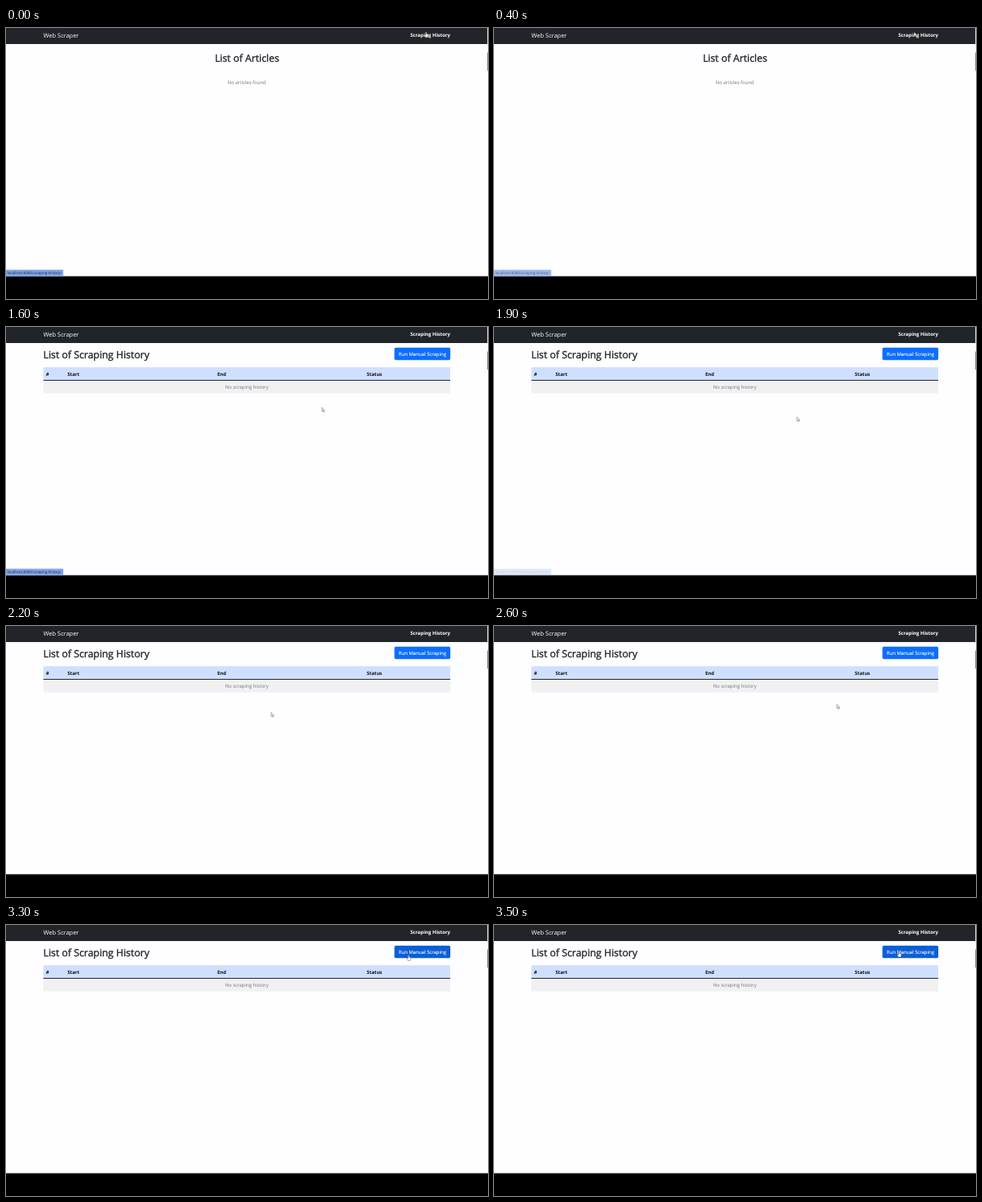
An HTML page for the animation above (5000 ms loop, 600 by 338 pixels).

```html
<!DOCTYPE html>
<html lang="en">
<head>
<meta charset="utf-8">
<title>Web Scraper</title>
<style>
html, body { margin: 0; width: 100%; height: 100%; overflow: hidden; background: #000; }
svg { display: block; width: 600px; height: 338px; }
text { font: 6px "Open Sans", "Noto Sans", sans-serif; fill: #212529; text-rendering: geometricPrecision; }
.brand { font-size: 7.5px; fill: #fff; }
.nav { font-size: 6.1px; font-weight: 700; fill: #fff; text-anchor: end; }
/* A thin stroke stands in for a medium weight. */
.title { font-size: 12.38px; stroke: #212529; stroke-width: .35; }
.muted { fill: #6c757d; text-anchor: middle; }
.head { font-weight: 700; fill: #111; }
.button { fill: #fff; stroke: #fff; stroke-width: .1; text-anchor: middle; }
.url { font-size: 4.5px; fill: #20252e; }
.pointer { fill: #fff; stroke: #555; stroke-width: .5; stroke-linejoin: round; }
</style>
</head>
<body>
<svg viewBox="0 0 600 338">
  <rect width="600" height="309.6" fill="#fefdff"/>
  <rect width="599.2" height="20" fill="#212529"/>
  <text class="brand" x="46.5" y="11.9">Web Scraper</text>
  <text class="nav" x="553" y="11.2">Scraping History</text>
  <rect x="599" y="30.5" width="1" height="22.5" fill="#8b8b8b"/>

  <g id="articles">
    <text class="title" x="300" y="41.7" text-anchor="middle">List of Articles</text>
    <text class="muted" x="299.8" y="70.2">No articles found</text>
  </g>

  <g id="history">
    <text class="title" x="46.5" y="38.7">List of Scraping History</text>
    <rect id="run" x="483.5" y="25.8" width="69.6" height="15.5" rx="1.8"/>
    <text class="button" x="518.4" y="36">Run Manual Scraping</text>
    <rect x="46.5" y="50.2" width="506.5" height="16" fill="#cfe0fe"/>
    <rect id="row" x="46.5" y="67" width="506.5" height="15.8"/>
    <rect x="46.5" y="66" width="506.5" height="1" fill="#212529"/>
    <text class="head" x="49.8" y="60.7">#</text>
    <text class="head" x="76.5" y="60.7">Start</text>
    <text class="head" x="263" y="60.7">End</text>
    <text class="head" x="449" y="60.7">Status</text>
    <text class="muted" x="299.8" y="77.3">No scraping history</text>
  </g>

  <g id="link">
    <rect y="301.5" width="71.3" height="8.1" fill="#7fa3e6"/>
    <text class="url" x="1.5" y="307.4">localhost:8000/scraping-history/</text>
  </g>

  <g id="cursor">
    <path id="arrow" class="pointer" d="M0 0V5L1.2 3.9L2 5.8L2.8 5.4L2.1 3.6H3.6Z"/>
    <path id="hand" class="pointer" d="M-.6 0Q0-.7.6 0V2L2.7 2.7V4.8L2 6.6H-.9L-2.4 4V3.1L-.6 3.8Z"/>
  </g>
</svg>
<script>
const LOOP = 5000, STEP = 100;
const $ = id => document.getElementById(id);
const show = (id, on) => $(id).setAttribute("visibility", on ? "visible" : "hidden");
const easeOut = u => 1 - (1 - u) ** 2;

const home = { x: 523, y: 5.2 };
const glides = [
  { from: 1400, to: 1700, x: 377, y: 112.3 },
  { from: 1900, to: 2200, x: 330, y: 107.8 },
  { from: 2400, to: 2700, x: 439, y: 96.5 },
  { from: 2800, to: 2900, x: 476, y: 73.8 },
  { from: 2900, to: 3500, x: 504.3, y: 33.3 }
];

function cursorAt(t) {
  let { x, y } = home;
  for (const g of glides) {
    const u = easeOut(Math.min(1, Math.max(0, (t - g.from) / (g.to - g.from))));
    x += (g.x - x) * u;
    y += (g.y - y) * u;
  }
  return { x, y };
}

function linkOpacity(t) {
  if (t >= 1900) return Math.max(0, .22 - (t - 1900) / 1000);
  return t >= 400 && t < 1000 ? .75 : 1;
}

function draw(now) {
  const t = Math.floor(now % LOOP / STEP) * STEP;
  const { x, y } = cursorAt(t);
  const overRun = t > 2900 && y < 41;
  const overRow = t > 2700 && y > 67 && y < 83;
  const hand = t < 100 || (t >= 1000 && t < 1500) || overRun;

  show("articles", t < 1000);
  show("history", t >= 1000);
  show("hand", hand);
  show("arrow", !hand);
  $("row").setAttribute("fill", overRow ? "#ebebec" : "#f2f1f2");
  $("run").setAttribute("fill", overRun ? "#0b5ed7" : "#0d6efd");
  $("link").setAttribute("opacity", linkOpacity(t));
  $("cursor").setAttribute("transform", `translate(${x} ${y})`);
}

const start = performance.now();
function tick() {
  draw(performance.now() - start);
  requestAnimationFrame(tick);
}
tick();
</script>
</body>
</html>
```
